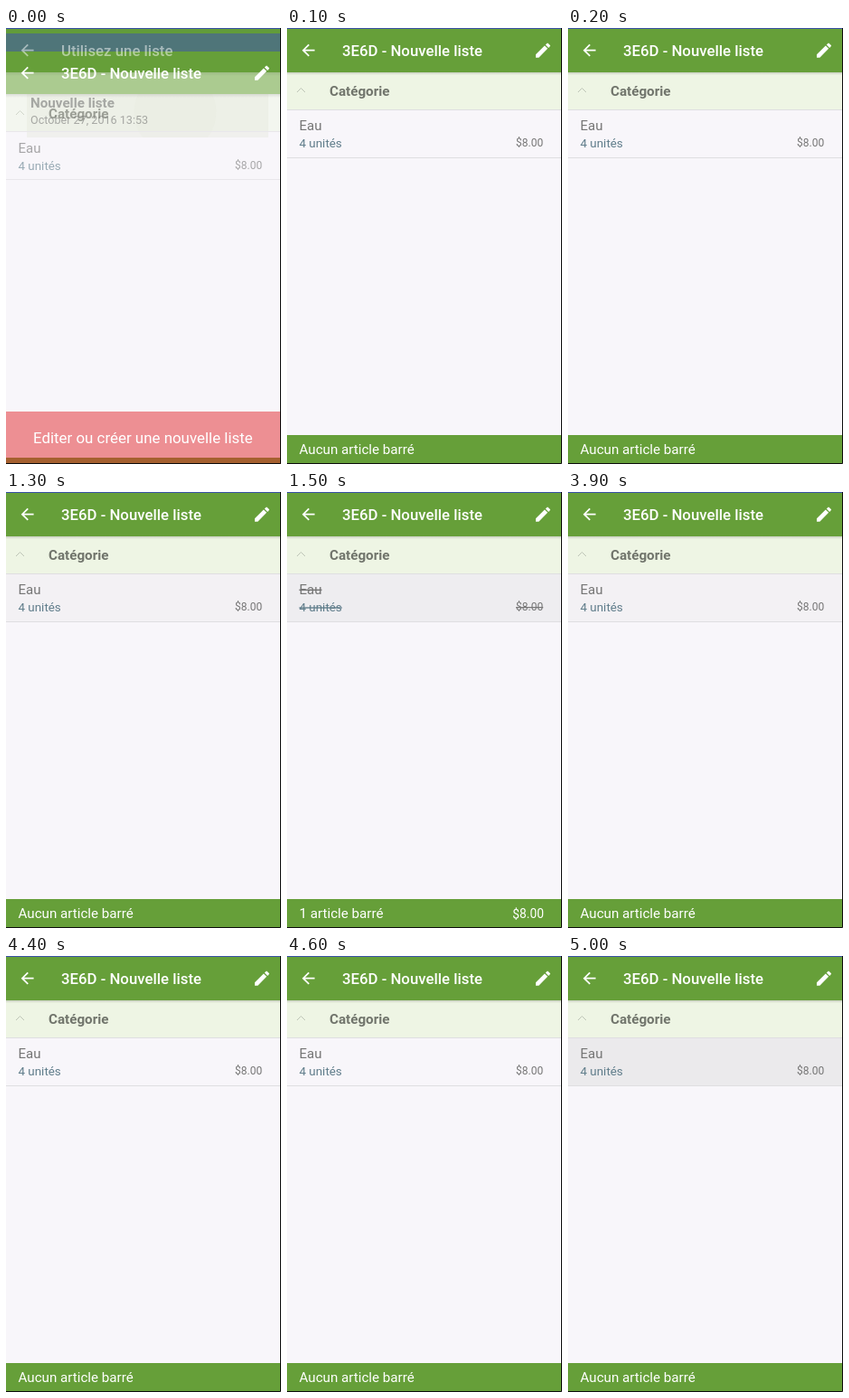
Write an HTML page that moves like this. It is 304 px wide and 482 px high and loops after 5.1 s.

```html
<!DOCTYPE html>
<html lang="fr">
<head>
<meta charset="utf-8">
<title>Liste</title>
<style>
  html, body { margin: 0; width: 100%; height: 100%; overflow: hidden; background: #f8f6fa; }
  svg { display: block; width: 304px; height: 482px; font-family: Roboto, sans-serif; }
  .title { font-size: 16.8px; font-weight: 500; }
  .head { font-size: 15.2px; font-weight: 700; }
  .name { font-size: 15px; }
  .qty { font-size: 13.4px; }
  .price { font-size: 12px; }
  .date { font-size: 12.6px; }
  .button { font-size: 16.9px; }
  .count { font-size: 15.15px; }
  .total { font-size: 13.8px; }
  .struck text { text-decoration: line-through; }
</style>
</head>
<body>
<svg viewBox="0 0 304 482" xmlns="http://www.w3.org/2000/svg">
  <defs>
    <linearGradient id="shade" x2="0" y2="1">
      <stop offset="0" stop-color="#000" stop-opacity=".16"/>
      <stop offset="1" stop-color="#000" stop-opacity="0"/>
    </linearGradient>
    <path id="back" transform="translate(13.2 14.2) scale(.87)"
      d="M20 11H7.83l5.59-5.59L12 4l-8 8 8 8 1.41-1.41L7.83 13H20z"/>
    <path id="pencil" transform="translate(272.3 14) scale(.89)"
      d="M3 17.25V21h3.75L17.81 9.94l-3.75-3.75zM20.71 7.04a1 1 0 0 0 0-1.41l-2.34-2.34a1 1 0 0 0-1.41 0l-1.83 1.83 3.75 3.75z"/>
    <g id="bar" fill="#fff">
      <use href="#back"/>
      <use href="#pencil"/>
      <text class="title" x="61" y="31">3E6D - Nouvelle liste</text>
    </g>
    <g id="section">
      <path d="M11 71l4.5-4.5L20 71" fill="none" stroke="#bdc4b6"/>
      <text class="head" x="47" y="75" fill="#71756c">Catégorie</text>
    </g>
  </defs>

  <rect width="304" height="482" fill="#f8f6fa"/>

  <g id="list">
    <rect y="49" width="304" height="41" fill="#eef5e4"/>
    <rect id="press" y="90" width="304" height="53" fill="#ebeaec"/>
    <path d="M0 90.5H304M0 143.5H304" stroke="#dfdee1"/>
    <rect y="49" width="304" height="3" fill="url(#shade)"/>
    <rect width="304" height="49" fill="#669f39"/>
    <use href="#bar"/>
    <use href="#section"/>
    <g id="row">
      <text class="name" x="13.5" y="113" fill="#757575">Eau</text>
      <text class="qty" x="13.5" y="132" fill="#607d8b">4 unités</text>
      <text class="price" x="283.2" y="131.3" fill="#757575" text-anchor="end">$8.00</text>
    </g>
    <rect y="450" width="304" height="31" fill="#669f39"/>
    <g fill="#fff">
      <text id="count" class="count" x="13.5" y="471"></text>
      <text id="total" class="total" x="284" y="471" text-anchor="end">$8.00</text>
    </g>
  </g>

  <g id="enter">
    <rect y="73" width="304" height="42" fill="#f3f6ef"/>
    <rect x="23" y="73" width="267" height="48" fill="#e4e8dc" opacity=".45"/>
    <path d="M151 121A48 48 0 0 1 146 73H228A48 48 0 0 1 223 121z" fill="#dfe4d6" opacity=".2"/>
    <path d="M0 114.5H304M0 167.5H304" stroke="#e9e7eb"/>
    <rect y="73" width="304" height="4" fill="url(#shade)" opacity=".6"/>
    <rect width="304" height="6" fill="#629c3a"/>
    <rect y="6" width="304" height="20" fill="#4f7579"/>
    <rect y="26" width="304" height="23" fill="#669f39"/>
    <rect y="49" width="304" height="24" fill="#abcb90"/>
    <rect y="49" width="304" height="4" fill="url(#shade)" opacity=".5"/>
    <g fill="#fff" opacity=".5">
      <use href="#back"/>
      <text class="title" x="61" y="31">Utilisez une liste</text>
    </g>
    <g opacity=".55" fill="#6c6c6c">
      <text class="head" x="27" y="88">Nouvelle liste</text>
      <text class="date" x="27" y="106">October 27, 2016 13:53</text>
    </g>
    <g transform="translate(0 25)">
      <use href="#bar"/>
      <use href="#section" opacity=".65"/>
      <use href="#row" opacity=".62"/>
    </g>
    <rect y="424" width="304" height="51" fill="#ed8f93"/>
    <text class="button" x="30" y="459" fill="#fff">Editer ou créer une nouvelle liste</text>
    <rect y="475" width="304" height="7" fill="#a5602f"/>
  </g>

  <rect width="304" height="1" fill="#3a52a8"/>
  <path d="M303.5 0V481.5H0" fill="none" stroke="#0c0c0c"/>
</svg>
<script>
  const LOOP = 5100, STEP = 100;
  const TAPS = [1300, 3900, 4900];
  const $ = id => document.getElementById(id);
  const show = (id, on) => $(id).setAttribute("visibility", on ? "visible" : "hidden");

  // Quick rise on touch, then a fade over the next steps.
  function glow(age) {
    if (age < 0 || age >= 500) return 0;
    return age < 100 ? 0.45 : Math.min(1, (500 - age) / 400);
  }

  function draw(ms) {
    const t = Math.floor((ms % LOOP) / STEP) * STEP;
    const struck = t >= 1400 && t < 3900;
    show("enter", t < 100);
    show("list", t >= 100);
    show("total", struck);
    $("press").setAttribute("opacity", Math.max(...TAPS.map(s => glow(t - s))));
    $("row").setAttribute("class", struck ? "struck" : "");
    $("count").textContent = struck ? "1 article barré" : "Aucun article barré";
  }

  const start = performance.now();
  function tick() {
    draw(performance.now() - start);
    requestAnimationFrame(tick);
  }
  draw(0);
  requestAnimationFrame(tick);
</script>
</body>
</html>
```
